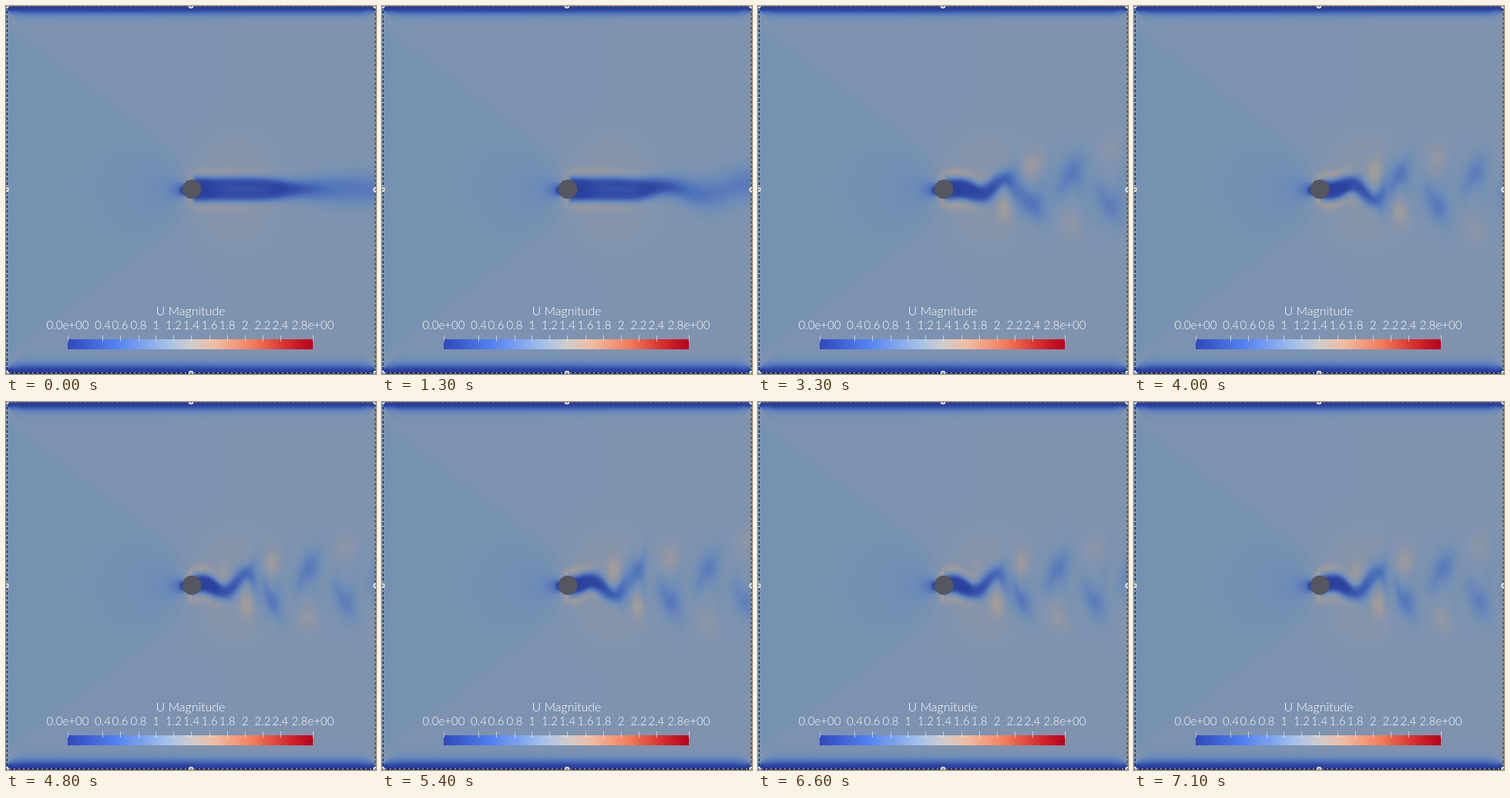
Animation, 480 px wide and 477 px high, one loop 7200 ms. Source, as an HTML page with a canvas:

```html
<!DOCTYPE html>
<html lang="en">
<head>
<meta charset="utf-8">
<title>Flow past a cylinder</title>
<style>
  html, body { margin: 0; width: 100%; height: 100%; overflow: hidden; background: #7891b0; }
  canvas { display: block; }
</style>
</head>
<body>
<canvas id="stage" width="480" height="477"></canvas>
<script>
const W = 480, H = 477, CX = 241, CY = 238, R = 12.5;
const STEP = 100, STEPS = 72;
const ctx = document.getElementById('stage').getContext('2d');

const smooth = (a, b, x) => {
  const k = Math.min(1, Math.max(0, (x - a) / (b - a)));
  return k * k * (3 - 2 * k);
};
const bell = (x, w) => Math.exp(-(x * x) / (w * w));

// Piecewise linear value at x
function sample(keys, values, x) {
  let i = 1;
  while (i < keys.length - 1 && x > keys[i]) i++;
  const k = Math.min(1, Math.max(0, (x - keys[i - 1]) / (keys[i] - keys[i - 1])));
  return values[i - 1] + (values[i] - values[i - 1]) * k;
}

// Speed to colour, as seen through the translucent slice
const SPEEDS = [0, 0.2, 0.5, 0.8, 0.95, 1.05, 1.2, 1.5];
const CHANNELS = [
  [38, 45, 76, 108, 119, 127, 138, 172],
  [56, 68, 112, 138, 145, 147, 149, 160],
  [148, 160, 186, 184, 177, 175, 168, 148]
];
const LUT = Array.from({ length: 481 }, (_, i) =>
  CHANNELS.map(c => Math.round(sample(SPEEDS, c, i / 320))));

// Time keys: shedding cycles, bubble end, meander strength, blob separation
const TIMES = [0, 1300, 2600, 4000, 4800, 6000, 7100];
const CYCLES = [-2.1, -0.02, 2.08, 4.83, 6.33, 8.95, 11.41];
const BUBBLE = [345, 335, 290, 270, 263, 265, 262];
const MEANDER = [0, 0.3, 0.95, 1, 1, 1, 1];
const SPLIT = [0, 0.1, 0.5, 0.8, 0.85, 0.85, 0.85];

// Steady part: walls, inflow wedge and stagnation zone
function baseSpeed(x, y) {
  const off = Math.abs(y - CY);
  const wedge = 280 - 1.33 * off;
  let v = 0.95 + 0.06 * smooth(wedge - 6, wedge + 14, x) + 0.04 * smooth(180, 330, x);

  const wall = Math.max(0, Math.min(y - 1, H - 2 - y));
  const side = Math.min(x, W - x);
  v -= 0.93 * bell(wall, (y < CY ? 10.5 : 13) * (0.6 + 0.4 * smooth(0, 24, side)));
  if (side < 26) v -= 0.16 * bell(wall - side, 4) * (1 - side / 26);

  const dx = x - CX, r2 = Math.max(R * R, dx * dx + off * off);
  if (dx < 0) {
    const dip = (R * R / r2) * (dx * dx - off * off) / r2;
    v -= dip * (dip > 0 ? 0.95 : 0.35);
    v -= 0.05 * bell(dx + 30, 50) * bell(off, 50);
  }
  return v + 0.1 * bell(x - 290, 55) * bell(off - 38, 42);
}

function wakeColumn(x, time) {
  const end = sample(TIMES, BUBBLE, time);
  const sway = sample(TIMES, MEANDER, time);
  const length = 97 + 18 * (end - 265) / 70;
  const stretch = x < 345 ? 1.5 : 1;
  const wave = 2 * Math.PI / length;
  const angle = wave * stretch * (x - 345) -
    2 * Math.PI * (0.155 + sample(TIMES, CYCLES, time));
  const swing = Math.cos(angle);
  const height = 22 * sway * smooth(end - 40, end + 100, x);
  const slope = height * wave * stretch * Math.sin(angle);
  const width = 15 + 3 * smooth(262, 300, end) - 4 * bell(x - end - 35, 30) +
    (4 + 5 * sway) * smooth(end + 30, end + 110, x);
  return {
    angle, wave, swing,
    mid: 237 - height * swing,
    width: width * Math.hypot(1, slope),
    power: 5 - 3 * smooth(end - 40, end + 40, x),
    depth: (0.5 + 0.38 * (1 - smooth(end, end + 90, x)) -
      0.001 * Math.max(0, x - end - 70)) * smooth(238, 247, x),
    split: sample(TIMES, SPLIT, time) * smooth(end + 35, end + 85, x),
    tilt: 0.25 * smooth(310, 345, x),
    core: 0.08 * smooth(255, 270, x) * (1 - smooth(end - 15, end + 10, x)),
    shoulder: (0.25 + 0.15 * sway) * (0.4 + 0.6 * Math.exp(-Math.max(0, x - 250) / 40)) *
      smooth(229, 248, x) * (1 - smooth(end - 20, end + 45, x)),
    warm: 0.3 * sway * sway * smooth(end, end + 40, x) * (1 - 0.5 * smooth(310, 460, x)),
    reach: 0.22 * (x - 208)
  };
}

function wakeSpeed(c, y) {
  const off = Math.abs(y - CY), dy = Math.abs(y - c.mid);
  const lean = c.tilt * Math.min(25, off - 18);
  const blob = Math.cos(c.angle - c.wave * lean) ** 2;
  const drop = c.depth * (1 - c.split * (1 - blob)) * Math.exp(-Math.pow(dy / c.width, c.power));
  const opposite = CY + Math.sign(c.swing) * c.reach;
  return c.core * bell(dy, 6) - drop +
    c.shoulder * bell(dy - c.width - 3, 8) +
    c.warm * c.swing * c.swing * bell(y - opposite, 18);
}

const base = new Float32Array(W * H);
const image = ctx.createImageData(W, H);

function paint(i, v) {
  const rgb = LUT[Math.max(0, Math.min(480, Math.round(v * 320)))];
  image.data[4 * i] = rgb[0];
  image.data[4 * i + 1] = rgb[1];
  image.data[4 * i + 2] = rgb[2];
  image.data[4 * i + 3] = 255;
}

for (let y = 0; y < H; y++) {
  for (let x = 0; x < W; x++) {
    base[y * W + x] = baseSpeed(x, y);
    paint(y * W + x, base[y * W + x]);
  }
}

function disc(x, y, r, fill) {
  ctx.beginPath();
  ctx.arc(x, y, r, 0, 2 * Math.PI);
  ctx.fillStyle = fill;
  ctx.fill();
}

const LEGEND = [['0.0e+00', 80], ['0.4', 125.5], ['0.6', 148], ['0.8', 172], ['1', 194.5],
  ['1.2', 217.5], ['1.4', 240.5], ['1.6', 264], ['1.8', 287], ['2', 310], ['2.2', 333],
  ['2.4', 356], ['2.8e+00', 398]];
const ramp = ctx.createLinearGradient(80, 0, 398, 0);
[[0, '#3048bc'], [0.2, '#5283f3'], [0.4, '#a3bfea'], [0.5, '#cfcdcb'], [0.6, '#f0bda2'],
  [0.75, '#f57f5c'], [0.9, '#d62a2c'], [1, '#b80018']].forEach(s => ramp.addColorStop(...s));

function drawLegend() {
  ctx.fillStyle = ramp;
  ctx.fillRect(80, 432, 318, 13);
  ctx.fillStyle = '#fff';
  ctx.textAlign = 'center';
  ctx.font = '300 16px Lato, sans-serif';
  ctx.fillText('U Magnitude', 239.5, 401);
  ctx.font = '300 15px Lato, sans-serif';
  for (const [label, x] of LEGEND) {
    ctx.fillStyle = '#fff';
    ctx.fillText(label, x, 419);
    ctx.fillStyle = 'rgba(255,255,255,.55)';
    ctx.fillRect(Math.floor(x), 427, 1, 8);
  }
}

function drawSelection() {
  ctx.lineWidth = 1;
  for (const [color, dash] of [['#aab2c0', []], ['#222', [4, 2]]]) {
    ctx.strokeStyle = color;
    ctx.setLineDash(dash);
    ctx.strokeRect(1.5, 0, 477.5, 475.5);
  }
  ctx.setLineDash([]);
  for (const x of [0.5, 240, 479.5]) {
    for (const y of [0, 238, 476]) {
      if (x === 240 && y === 238) continue;
      disc(x, y, 3.2, '#eee');
      disc(x, y, 1.8, '#8a8f98');
    }
  }
}

function draw(time) {
  for (let x = 228; x < W; x++) {
    const column = wakeColumn(x, time);
    for (let y = 120; y < 356; y++) {
      const i = y * W + x;
      paint(i, base[i] + wakeSpeed(column, y));
    }
  }
  ctx.putImageData(image, 0, 0);
  disc(CX, CY - 0.5, R, '#55565f');
  drawLegend();
  drawSelection();
}

let shown = -1;
function tick() {
  const step = Math.floor(performance.now() / STEP) % STEPS;
  if (step !== shown) draw((shown = step) * STEP);
  requestAnimationFrame(tick);
}
tick();
</script>
</body>
</html>
```
